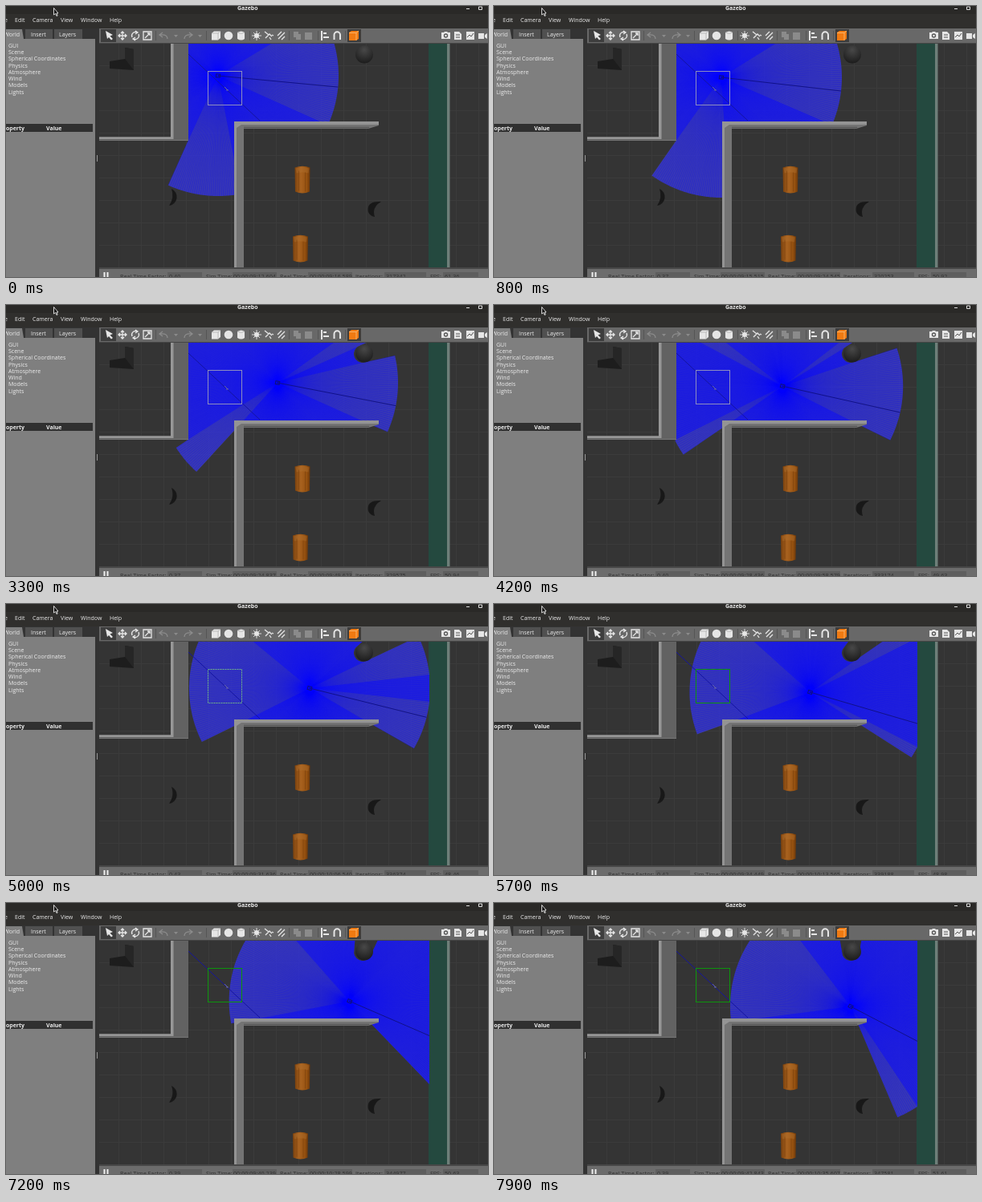
Write an HTML page that moves like this. It is 600 px wide and 338 px high and loops after 8000 ms.

```html
<!DOCTYPE html>
<html lang="en">
<head>
<meta charset="utf-8">
<title>Lidar robot in a simulated room</title>
<style>
html, body { margin: 0; width: 100%; height: 100%; overflow: hidden; background: #343434; }
svg { display: block; width: 600px; height: 338px; }
text { font: 7px "Open Sans", "Noto Sans", sans-serif; fill: #ececec; }
.bold { font-weight: 700; }
.status text { font-size: 7.2px; fill: #303030; }
.icons { fill: none; stroke: #e6e6e6; stroke-width: 1.3; }
.icons .solid { fill: #e6e6e6; stroke: none; }
.icons .dim { stroke: #8b8b8b; }
.icons .dim.solid { fill: #8b8b8b; stroke: none; }
</style>
</head>
<body>
<svg viewBox="0 0 600 338">
  <defs>
    <clipPath id="view"><rect x="116" y="47" width="484" height="279"/></clipPath>
    <pattern id="grid" x="168" y="46" width="28" height="28" patternUnits="userSpaceOnUse">
      <path d="M.5 0V28M0 .5H28" stroke="#3b3b3b" fill="none"/>
    </pattern>
    <linearGradient id="wood">
      <stop offset="0" stop-color="#7b410d"/><stop offset=".4" stop-color="#a8621f"/>
      <stop offset=".8" stop-color="#94500f"/><stop offset="1" stop-color="#6b370a"/>
    </linearGradient>
    <radialGradient id="ball" cx=".5" cy=".25" r=".75">
      <stop offset="0" stop-color="#484848"/><stop offset="1" stop-color="#1c1c1c"/>
    </radialGradient>
    <g id="barrel">
      <path d="M0 2Q9.5-1.5 19 2L18.5 32Q9.500 36 .5 32Z" fill="url(#wood)"/>
      <path d="M1 3Q9.500 0 18 3L17 9Q9 7 2 9Z" fill="#b57535" opacity=".35"/>
      <path d="M5 6V31M13 8V32" stroke="#70390b" opacity=".45"/>
    </g>
  </defs>

  <!-- 3D view -->
  <g clip-path="url(#view)">
    <rect x="116" y="47" width="484" height="279" fill="#343434"/>
    <rect x="116" y="47" width="484" height="279" fill="url(#grid)"/>
    <path d="M148 52L159 54V80L129 78V69L148 66Z" fill="#1d1d1d"/>
    <path d="M148 52L159 54V80L148 66Z" fill="#262626"/>
    <path d="M206 228A11 11 0 0 1 203 249Q210 239 206 228Z" fill="#181818"/>
    <path d="M467 244Q448 243 451 257Q453 262 459 263Q455 251 467 244Z" fill="#181818"/>
    <rect x="526" y="47" width="24" height="279" fill="#24493f"/>
    <rect x="549" y="47" width="3.500" height="279" fill="#6d7f79"/>

    <path id="fan" fill="#3c3cff" fill-opacity=".62"/>
    <path id="hits" fill="#0a0aff" fill-opacity=".48"/>
    <path id="rays" fill="none" stroke="#0000ff" stroke-opacity=".28"/>
    <path id="axis" stroke="#10108a" stroke-width="1"/>
    <path d="M213 47L316 143" stroke="#1414a0" stroke-width="1"/>
    <g id="bot" fill="none" stroke="#101078">
      <rect x="-2.500" y="-2" width="5" height="4"/><path d="M-.5 0H1.500"/>
    </g>
    <rect id="box" x="251.500" y="81.500" width="42" height="42" fill="none" stroke="#8c8cc0"/>
    <path d="M272 101L276 105M274 105H277" stroke="#7d7daa" stroke-width=".8"/>

    <circle cx="446" cy="60.500" r="11" fill="url(#ball)"/>
    <path d="M206 47H227V168H116V163H206Z" fill="#626262"/>
    <path d="M205 47H208.500V166H116V163.500H205Z" fill="#979797"/>
    <path d="M116 167.500H227" stroke="#777"/>
    <path d="M284 144H464V149L451 153H296V326H284Z" fill="#747474"/>
    <path d="M284 144H464V148H293L287 152V326H284Z" fill="#949494"/>
    <path d="M296 151.500H452" stroke="#585858" stroke-width="1.500"/>
    <use href="#barrel" x="359.500" y="199.500"/>
    <use href="#barrel" x="357" y="285.500"/>
  </g>

  <!-- Title and menu -->
  <rect width="600" height="28" fill="#302f2d"/>
  <rect width="600" height="10" fill="#2a2927"/>
  <text class="bold" x="288" y="5">Gazebo</text>
  <path d="M573 3.500H577M588.500 1V4.500H592.500V1Z" fill="none" stroke="#ddd"/>
  <g id="menu"></g>
  <path d="M59.500 2.500V11L61.500 9.500L63 12.500L64.200 12L62.800 9H65Z" fill="#111" stroke="#fff" stroke-width=".8"/>

  <!-- Side panel -->
  <rect y="28" width="116" height="310" fill="#333"/>
  <rect y="41" width="111" height="297" fill="#7f7f7f"/>
  <path d="M0 29H20L22 41H0Z" fill="#7f7f7f"/>
  <path d="M24 29H58V41H24ZM60 29H95V41H60Z" fill="#505050"/>
  <rect y="147" width="108" height="10" fill="#303030"/>
  <path d="M113.500 186V194" stroke="#999"/>
  <g id="panel"></g>

  <!-- Toolbar -->
  <rect x="116" y="28" width="484" height="19" fill="#686868"/>
  <path d="M116 46.500H600" stroke="#454545"/>
  <path d="M118 29H137V45H118ZM425 29H442V45H425Z" fill="#3d3d3d"/>
  <path d="M186.500 31V43M249.500 31V43M303.500 31V43M352.500 31V43M388.500 31V43M422.500 31V43" stroke="#555"/>
  <g class="icons">
    <path class="solid" d="M124 31L133 36L129.500 37.500L133 41L131 42.500L128 39L126 41Z"/>
    <path d="M140 37H150M145 32V42M142 35L140 37L142 39M148 35L150 37L148 39M143 34L145 32L147 34M143 40L145 42L147 40"/>
    <path d="M157 39A4.500 4.500 0 0 1 163 33M165 35A4.500 4.500 0 0 1 159 41M161 31L164 33L161 35M161 39L158 41L161 43"/>
    <path d="M171 32H181V42H171ZM173 40L179 34M176 34H179V37"/>
    <path class="dim" d="M201 41Q201 35 192 36M195 33L191 36L195 39M222 41Q222 35 231 36M228 33L232 36L228 39"/>
    <path class="dim solid" d="M209 36H214L211.500 39ZM239 36H244L241.500 39Z"/>
    <path class="solid" d="M256 34L259 31.500H267V40L264 42.500H256ZM288 33Q293 30 297 33V41Q293 44 288 41Z"/>
    <circle class="solid" cx="277" cy="37" r="5.300"/>
    <path d="M256 34H264V42M264 34L267 31.500M288 33Q293 36 297 33" stroke="#aaa" stroke-width=".7"/>
    <circle class="solid" cx="312" cy="37" r="3"/>
    <path d="M312 31V43M306 37H318M308 33L316 41M316 33L308 41" stroke-width=".9"/>
    <path d="M322 32L327 36M323 40L328 35L331 38M328 39L330 42M331 36L333 37M338 37L343 32M339 41L347 33M343 42L347 38"/>
    <path class="dim solid" d="M358 32H364V39H358ZM361 35H367V42H361ZM372 33H381V42H372Z"/>
    <path d="M393 31V43M395 34H399M395 39H402" stroke-width="2"/>
    <path d="M408.500 42V36A3.700 3.700 0 0 1 416 36V42" stroke-width="2"/>
    <path class="solid" d="M542 33H545L546 32H549L550 33H553V41H542ZM558 32H564L567 35V42H558ZM573 32H583V42H573ZM588 34H595V41H588ZM596 36L599 34V41L596 39Z"/>
    <circle cx="547.500" cy="37" r="2" stroke="#555"/>
    <path d="M560 36H565M560 39H565M574 39L577 36L579 38L582 34" stroke="#555" stroke-width="1"/>
  </g>
  <path d="M427 33L430 31H439V41L436 43H427Z" fill="#f07a12"/>
  <path d="M427 33.500H436V43M436 33.500L439 31" fill="none" stroke="#ffc07a" stroke-width=".8"/>

  <!-- Status bar -->
  <rect x="116" y="326" width="484" height="12" fill="#6c6c6c"/>
  <path d="M116 327H600" stroke="#484848" stroke-width="2"/>
  <path d="M201 332H244V338H201ZM282 332H337V338H282ZM376 332H431V338H376ZM471 332H523V338H471ZM544 332H588V338H544Z" fill="#5e5e5e"/>
  <path d="M122.500 332V338M126.500 332V338" stroke="#eee" stroke-width="2"/>
  <g class="status" id="status"></g>
</svg>
<script>
const $ = id => document.getElementById(id);
const LOOP = 8000, RANGE = 150;

function addText(parent, x, y, str, cls) {
  const el = document.createElementNS("http://www.w3.org/2000/svg", "text");
  el.setAttribute("x", x);
  el.setAttribute("y", y);
  if (cls) el.setAttribute("class", cls);
  el.textContent = str;
  $(parent).append(el);
  return el;
}

[["Edit", 11], ["Camera", 33], ["View", 68], ["Window", 93], ["Help", 129]]
  .forEach(([s, x]) => addText("menu", x, 19.5, s));
addText("menu", 2, 19.5, "File").setAttribute("text-anchor", "end");
addText("panel", 17, 38, "World").setAttribute("text-anchor", "end");
addText("panel", 31, 38, "Insert");
addText("panel", 66, 38, "Layers");
["GUI", "Scene", "Spherical Coordinates", "Physics", "Atmosphere", "Wind", "Models", "Lights"]
  .forEach((s, i) => addText("panel", 3, 51.7 + 8.28 * i, s));
addText("panel", 23, 155, "Property", "bold").setAttribute("text-anchor", "end");
addText("panel", 50, 155, "Value", "bold");
[["Real Time Factor:", 142], ["Sim Time:", 249], ["Real Time:", 341], ["Iterations:", 435], ["FPS:", 528]]
  .forEach(([s, x]) => addText("status", x, 339.5, s));
const [factor, simTime, realTime, iterations, fps] =
  [203, 283, 378, 473, 546].map(x => addText("status", x, 339.5, ""));

// Values at the key times: robot x, y, heading (degrees), sim time, real time, speed factor, fps
const keys = [
  [0, 264, 87, 5.4, 552.604, 556.589, .40, 61.36],
  [800, 283, 89, 6.5, 555.515, 564.545, .37, 50.92],
  [1900, 308, 92, 8, 559.639, 575.746, .39, 51.05],
  [3300, 338, 97, 11, 564.837, 589.623, .37, 50.94],
  [5000, 378, 105, 14, 571.636, 606.540, .43, 48.46],
  [6400, 409, 115, 18.6, 577.263, 620.590, .40, 49.51],
  [7900, 444, 129, 27.6, 582.843, 635.607, .39, 51.61]
];

function stateAt(t) {
  let i = 0;
  while (i < keys.length - 2 && t >= keys[i + 1][0]) i++;
  const a = keys[i], b = keys[i + 1], k = (t - a[0]) / (b[0] - a[0]);
  return a.map((v, j) => v + (b[j] - v) * k).slice(1);
}

// Obstacles at the height of the scanner: [fixed coordinate, from, to]
const upright = [[227, -200, 168], [292, 148, 400], [527, -200, 400]];
const level = [[10, 0, 600], [148, 292, 452]];
const ball = { x: 444, y: 61, r: 11 };

function cast(x, y, angle) {
  const dx = Math.cos(angle), dy = Math.sin(angle);
  let best = RANGE;
  const test = (d, pos, from, to) => {
    if (d > 0 && d < best && pos >= from && pos <= to) best = d;
  };
  for (const [wx, a, b] of upright) { const d = (wx - x) / dx; test(d, y + d * dy, a, b); }
  for (const [wy, a, b] of level) { const d = (wy - y) / dy; test(d, x + d * dx, a, b); }
  const along = (ball.x - x) * dx + (ball.y - y) * dy;
  const off = (ball.x - x) * dy - (ball.y - y) * dx;
  if (Math.abs(off) < ball.r) test(along - Math.sqrt(ball.r ** 2 - off ** 2), 0, 0, 0);
  return { d: best, px: (x + best * dx).toFixed(1), py: (y + best * dy).toFixed(1) };
}

function drawScan(x, y, heading) {
  const center = x.toFixed(1) + " " + y.toFixed(1);
  const fan = [], hits = [];
  let rays = "";
  for (let i = 0; i < 1440; i++) {
    const { d, px, py } = cast(x, y, (heading + i / 4 + .01) * Math.PI / 180);
    const end = px + " " + py;
    fan.push(end);
    hits.push(d < RANGE ? end : center);
    if (i % 4 === 0) rays += "M" + center + "L" + end;
    if (i === 0) $("axis").setAttribute("d", "M" + center + "L" + end);
  }
  $("fan").setAttribute("d", "M" + fan.join("L") + "Z");
  $("hits").setAttribute("d", "M" + hits.join("L") + "Z");
  $("rays").setAttribute("d", rays);
  $("bot").setAttribute("transform", `translate(${center}) rotate(${heading})`);
}

function clock(s) {
  const two = n => String(n).padStart(2, "0");
  return `00:00:${two(Math.floor(s / 60))}:${(s % 60).toFixed(3).padStart(6, "0")}`;
}

function draw(t) {
  const [x, y, heading, sim, real, speed, rate] = stateAt(t);
  drawScan(x, y, heading);
  const mixed = t >= 4600 && t < 5500;
  $("box").setAttribute("stroke", t < 4600 ? "#8c8cc0" : mixed ? "#70b487" : "#0c940c");
  $("box").setAttribute("stroke-dasharray", mixed ? "2 1" : "none");
  factor.textContent = speed.toFixed(2);
  simTime.textContent = clock(sim);
  realTime.textContent = clock(real);
  iterations.textContent = Math.round(sim * 1000 - 235262);
  fps.textContent = rate.toFixed(2);
}

const start = performance.now();
let last = -1;
function tick() {
  const t = Math.floor((performance.now() - start) % LOOP / 100) * 100;
  if (t !== last) draw(last = t);
  requestAnimationFrame(tick);
}
tick();
</script>
</body>
</html>
```
